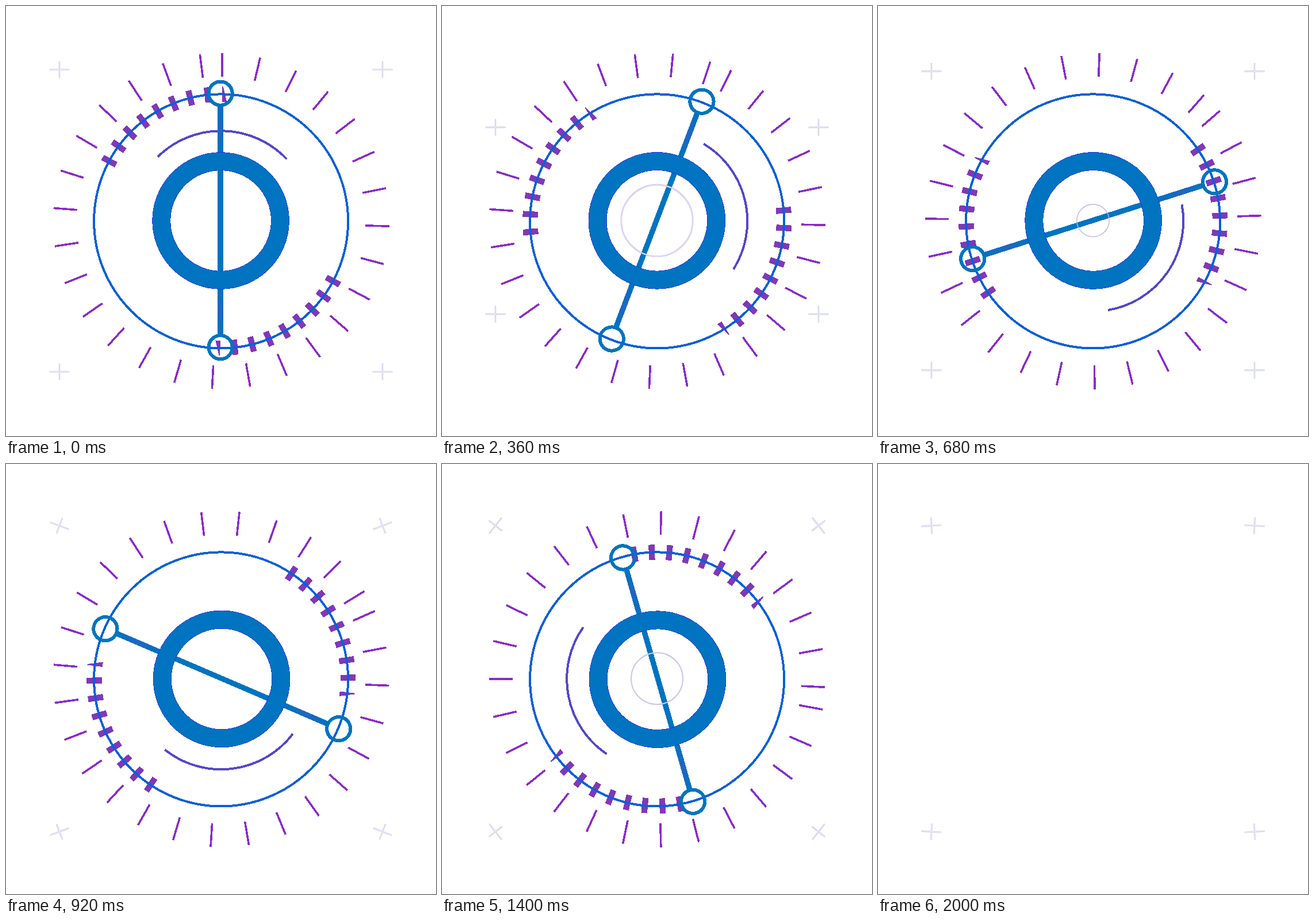
Write an HTML page that moves like this. It is 748 px wide and 748 px high and loops after 2040 ms.

```html
<!DOCTYPE html>
<html lang="en">
<head>
<meta charset="utf-8">
<title>Dial</title>
<style>
  html, body { margin: 0; width: 100%; height: 100%; overflow: hidden; background: #fff; }
  svg { display: block; width: 100vw; height: 100vh; }
</style>
</head>
<body>
<svg id="stage" viewBox="0 0 748 748" fill="none">
  <defs>
    <linearGradient id="rod" gradientUnits="userSpaceOnUse" x1="0" y1="-198" x2="0" y2="198">
      <stop offset="0" stop-color="#0074c0"/>
      <stop offset=".1" stop-color="#2066c2"/>
      <stop offset=".2" stop-color="#0074c0"/>
      <stop offset=".8" stop-color="#0074c0"/>
      <stop offset=".9" stop-color="#2066c2"/>
      <stop offset="1" stop-color="#0074c0"/>
    </linearGradient>
  </defs>
  <g id="crosses"></g>
  <g id="dial" shape-rendering="crispEdges">
    <g id="spokes" stroke="#8a2bca" stroke-width="3.6"></g>
    <g id="ticks" fill="#8038b8"></g>
    <circle cx="374.1" cy="374.4" r="221" stroke="#0860d8" stroke-width="4"/>
    <path id="arc" stroke="#5248cc" stroke-width="4"/>
    <path id="lever" d="M-.3-198V198" stroke="url(#rod)" stroke-width="9.4"/>
    <g id="pulse" shape-rendering="auto">
      <circle stroke="#c4b4e2"/>
      <circle stroke="#fff"/>
    </g>
    <g id="hub">
      <circle r="103.3" stroke="#2a30e4" stroke-width="32"/>
      <circle r="103.3" stroke="#0074c0" stroke-width="30.4"/>
    </g>
    <g id="knobs" stroke="#0074c0" stroke-width="6">
      <circle cy="-220.8" r="20.6"/>
      <circle cy="220.8" r="20.6"/>
    </g>
  </g>
</svg>
<script>
const LOOP = 2040, STEP = 40, TURN = 1960;
const CX = 374.2, CY = 374.2;
const $ = id => document.getElementById(id);

function add(parent, tag, attrs) {
  const el = document.createElementNS('http://www.w3.org/2000/svg', tag);
  for (const k in attrs) el.setAttribute(k, attrs[k]);
  parent.appendChild(el);
  return el;
}
const move = (el, x, y, a = 0) =>
  el.setAttribute('transform', `translate(${x} ${y}) rotate(${a})`);

// Turn about the centre, with the part itself set slightly off it
const orbit = (el, a, dx, dy) =>
  el.setAttribute('transform', `translate(${CX} ${CY}) rotate(${a}) translate(${dx} ${dy})`);

// Cubic bezier easing with flat ends
function ease(x, x1 = 0.337, x2 = 0.389) {
  if (x <= 0) return 0;
  if (x >= 1) return 1;
  let lo = 0, hi = 1, s;
  for (let i = 0; i < 30; i++) {
    s = (lo + hi) / 2;
    const u = 1 - s;
    if (3 * u * u * s * x1 + 3 * u * s * s * x2 + s * s * s < x) lo = s;
    else hi = s;
  }
  return s * s * (3 - 2 * s);
}

// Smooth curve through [time, value] keys
function track(keys, t) {
  const n = keys.length - 1;
  if (t <= keys[0][0]) return keys[0][1];
  if (t >= keys[n][0]) return keys[n][1];
  let i = 0;
  while (t > keys[i + 1][0]) i++;
  const slope = k => {
    const a = keys[Math.max(0, k - 1)], b = keys[Math.min(n, k + 1)];
    return (b[1] - a[1]) / (b[0] - a[0]);
  };
  const [t0, v0] = keys[i], [t1, v1] = keys[i + 1];
  const d = t1 - t0, s = (t - t0) / d, u = 1 - s;
  return v0 * u * u * (1 + 2 * s) + v1 * s * s * (3 - 2 * s)
    + d * s * u * (u * slope(i) - s * slope(i + 1));
}

const ARC = [[0, 0.9], [360, 76.7], [680, 125], [920, 173], [1400, 259.5], [1720, 317], [1960, 361]];
const SPIN = [[720, 0], [920, 21], [1400, 128], [1720, 165], [2000, 177]];

for (let i = 0; i < 28; i++)
  add($('spokes'), 'path', { d: 'M0-251V-292.5', transform: `rotate(${0.4 + i * 13.05})` });

for (const base of [298.2, 118.2])
  for (let i = 0; i < 9; i++)
    add($('ticks'), 'path', {
      d: i < 8 ? 'M-5.2-234H5.2V-207.5H-5.2Z' : 'M-5.2-234H-3.6L3.4-207.5H-5.2Z',
      transform: `rotate(${base + i * 7.95})`
    });

const polar = a => {
  const r = a * Math.PI / 180;
  return `${157 * Math.sin(r)} ${-157 * Math.cos(r)}`;
};
$('arc').setAttribute('d', `M${polar(-45.6)}A157 157 0 0 1 ${polar(45.6)}`);

const crosses = [[-1, -1], [1, -1], [-1, 1], [1, 1]].map(([sx, sy]) => {
  const el = add($('crosses'), 'g', {});
  const d = 'M-17.5 0H17.5M0-14.5V14.5';
  add(el, 'path', { d, stroke: '#bcbce4', 'stroke-width': 2.4 });
  add(el, 'path', { d, stroke: '#fff', 'stroke-width': 0.9 });
  return { el, sx, sy };
});

function draw(t) {
  // Corner marks dip toward the middle, then flip over
  const dip = t < 360 ? ease((t + 40) / 400) : 1 - ease((t - 360) / 420);
  const reach = 266.2 - 103.7 * dip;
  const spin = track(SPIN, t);
  for (const { el, sx, sy } of crosses)
    move(el, 374 + sx * 281, 373.5 + sy * reach, spin * sx * sy);

  $('dial').style.display = t > TURN ? 'none' : '';

  const p = t / TURN;
  move($('spokes'), CX, CY, 140 * p);
  move($('ticks'), CX, CY, -180 * p);
  move($('arc'), CX, CY, track(ARC, t));

  const angle = 180 * ease(p);
  orbit($('lever'), angle, -1.1, -1.3);
  orbit($('knobs'), angle, -1.1, -1.3);
  orbit($('hub'), angle, -0.6, -0.7);

  const r = Math.max(0, t < 946 ? 100.25 - 0.106 * t : 0.1 * (t - 950));
  const [rim, core] = $('pulse').children;
  move($('pulse'), 374, 373.2);
  $('pulse').style.display = r < 4 ? 'none' : '';
  for (const ring of [rim, core]) ring.setAttribute('r', r);
  rim.setAttribute('stroke-width', 0.5 + r * 0.033);
  core.setAttribute('stroke-width', Math.max(0, (r - 30) * 0.03));
}

const start = performance.now();
function tick() {
  const t = (performance.now() - start) % LOOP;
  draw(Math.floor(t / STEP) * STEP);
  requestAnimationFrame(tick);
}
draw(0);
requestAnimationFrame(tick);
</script>
</body>
</html>
```
